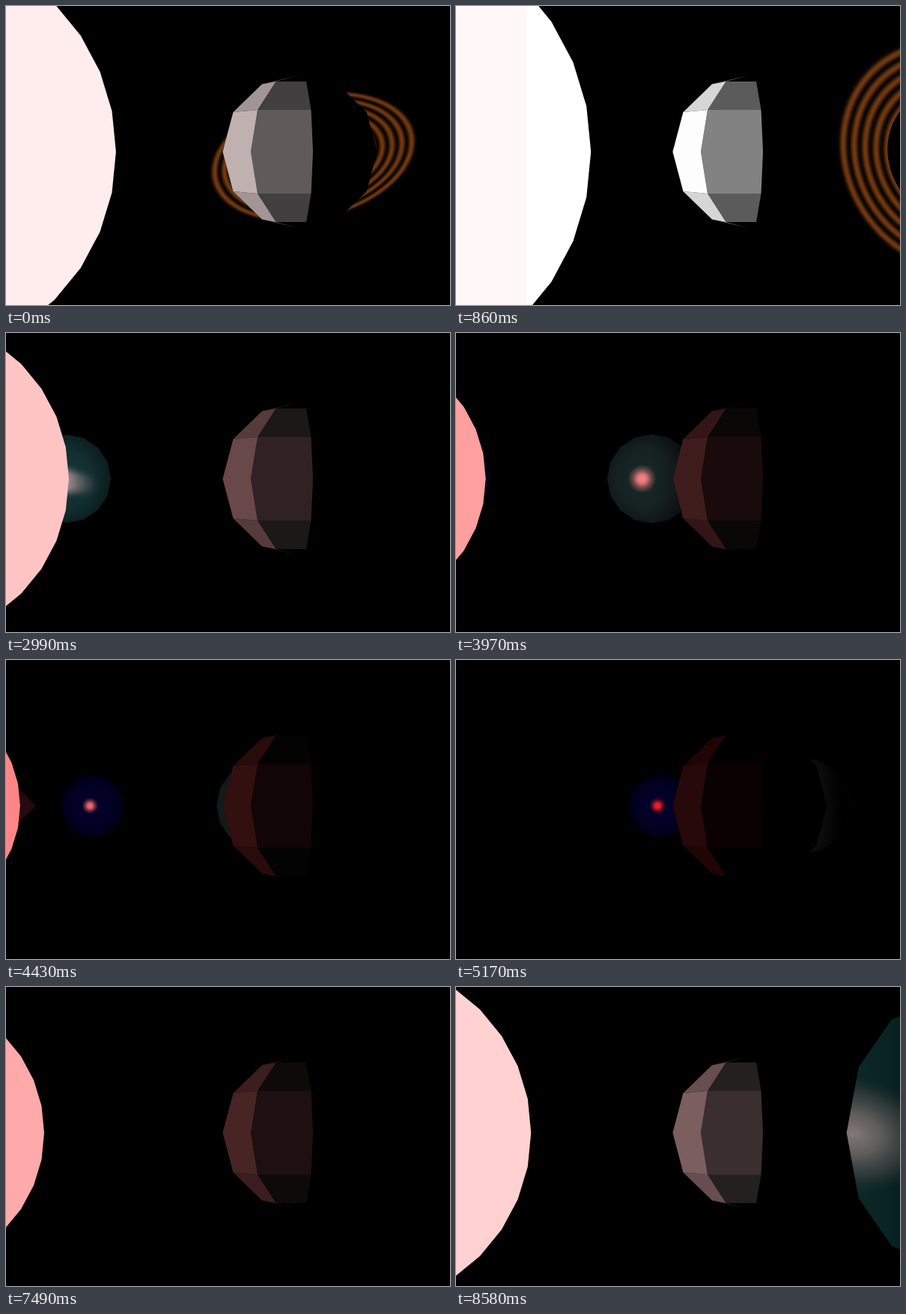
An HTML page with a canvas for the animation above (8600 ms loop, 593 by 400 pixels).

```html
<!DOCTYPE html>
<html lang="en">
<head>
<meta charset="utf-8">
<title>Low-poly planets</title>
<style>
html, body { margin: 0; width: 100%; height: 100%; overflow: hidden; background: #000; }
canvas { display: block; }
</style>
</head>
<body>
<canvas id="stage" width="593" height="400"></canvas>
<script>
const ctx = document.getElementById('stage').getContext('2d');
const W = 593, H = 400, LOOP = 8600, MID = 195;
const R_MIN = 127, R_MAX = 314, PACE = .0452;

const clamp = (v, lo = 0, hi = 1) => Math.min(hi, Math.max(lo, v));
const mix = (a, b, u) => a + (b - a) * u;
const mixColor = (a, b, u) => a.map((v, i) => mix(v, b[i], u));
const rgba = (c, alpha = 1) => `rgba(${c.map(Math.round).join(',')},${alpha})`;

// The star swells, shrinks to a hidden minimum, then swells again.
function starRadius(t) {
  return Math.max(R_MIN, 316 - PACE * Math.abs(t - 800), R_MIN + PACE * (t - 6230));
}

function starColor(light) {
  const g = 60 + 195 * light ** .48;
  return [255, g, g];
}

// A face goes from a dim red to a neutral grey; red leads the other channels.
function faceColor(light, red, rest, grey) {
  const ease = c => light * mix(light, 1, c);
  const cold = mix(rest, grey, ease(.1));
  return [mix(red, grey, ease(.27)), cold, cold];
}

function trace(points) {
  ctx.beginPath();
  points.forEach(([x, y]) => ctx.lineTo(x, y));
  ctx.closePath();
}

function poly(points, fill) {
  trace(points);
  ctx.fillStyle = fill;
  ctx.fill();
}

function ngon(n, x, y, rx, ry = rx) {
  return Array.from({ length: n }, (_, i) => {
    const a = i / n * 2 * Math.PI;
    return [x + rx * Math.cos(a), y + ry * Math.sin(a)];
  });
}

function disc(x, y, r, fill) {
  ctx.beginPath();
  ctx.arc(x, y, r, 0, 2 * Math.PI);
  ctx.fillStyle = fill;
  ctx.fill();
}

function withStops(g, stops) {
  stops.forEach(([at, c]) => g.addColorStop(at, c));
  return g;
}

const radial = (x, y, r, stops) => withStops(ctx.createRadialGradient(x, y, 0, x, y, r), stops);
const sideways = (x0, x1, stops) => withStops(ctx.createLinearGradient(x0, 0, x1, 0), stops);

function glow(x, r, star) {
  const c = star.map((v, i) => i ? v - 28 : v);
  disc(x, MID, r, radial(x, MID, r,
    [[0, rgba(c)], [.3, rgba(c, .88)], [.65, rgba(c, .35)], [1, rgba(c, 0)]]));
}

const RING_IN = 88, RING_OUT = 155;
const ringFill = withStops(ctx.createRadialGradient(0, 0, RING_IN, 0, 0, RING_OUT),
  Array.from({ length: 81 }, (_, i) => {
    const r = mix(RING_IN, RING_OUT, i / 80);
    const band = r > 153 ? 0 : Math.cos(Math.PI * (r - 147) / 14.6) ** 2;
    return [i / 80, rgba([115, 57, 15].map(v => v * mix(.1, 1, band)))];
  }));

function rings(t) {
  if (t > 1250) return;
  const u = t / 860;
  ctx.save();
  ctx.transform(mix(.895, 1, u), mix(-.136, .113, u), 0, mix(.553, 1.02, u), mix(410, 664, u), 201.5);
  ctx.beginPath();
  ctx.arc(0, 0, RING_OUT, 0, 2 * Math.PI);
  ctx.arc(0, 0, RING_IN, 0, 2 * Math.PI, true);
  ctx.fillStyle = ringFill;
  ctx.fill();
  ctx.restore();
}

function tealPlanet(t, star) {
  if (t < 2400 || t > 6700) return;
  const p = (t - 2990) / 3240, seen = clamp(p);
  const x = mix(81, 623, p) + 20 * Math.sin(Math.PI * p);
  const r = 59 + 17 * seen ** 3;
  const base = mixColor([18, 47, 49], [26, 20, 19], seen ** .6);
  const shape = ngon(16, x, MID, r);
  poly(shape, radial(x - 6, MID, r + 6, [[0, rgba(base.map(v => v * 1.15))],
    [.6, rgba(base)], [1, rgba(base.map(v => v * .6))]]));
  const night = clamp((t - 3300) / 1800);
  poly(shape, sideways(x, x + r * .8, [[0, 'rgba(0,0,0,0)'], [1, rgba([0, 0, 0], night)]]));
  if (t > 3400) {
    glow(x - mix(2, 38, seen), 19, star);
    return;
  }
  ctx.save();
  ctx.filter = 'blur(4px)';
  poly([[x - 10, 180], [x + 38, 194], [x + 38, 212], [x - 10, 214]],
    sideways(x, x + 40, [[0, 'rgba(190,160,160,.85)'], [1, 'rgba(150,125,125,0)']]));
  ctx.restore();
}

function bluePlanet(t, star) {
  if (t < 3700 || t > 6340) return;
  const dt = t - 4430, x = 114 + .23 * dt - .000024 * dt * dt;
  disc(x + 1, MID, 45, radial(x + 1, MID, 45,
    [[0, '#04002c'], [.6, '#020024'], [.85, '#01001a'], [1, 'rgba(0,0,12,0)']]));
  glow(x - 2, 11, star);
}

function redPlanet(t) {
  if (t < 4000 || t > 4750) return;
  poly(ngon(4, 18 - .1 * (t - 4430), MID, 22), '#250810');
}

function nearPlanet(t) {
  const left = 522 + .3 * (8580 - t);
  if (left > W) return;
  ctx.save();
  ctx.translate(left, MID);
  trace(ngon(12, 120, 0, 120, 175));
  ctx.clip();
  ctx.fillStyle = sideways(0, 90, [[0, '#0e2a2a'], [1, '#061d1d']]);
  ctx.fillRect(0, -MID, 240, H);
  ctx.rotate(.2);
  ctx.scale(1, .72);
  disc(8, 0, 108, radial(8, 0, 108, [[0, 'rgb(132,120,120)'], [.35, 'rgba(110,102,101,.85)'],
    [.7, 'rgba(75,73,72,.55)'], [1, 'rgba(40,50,50,0)']]));
  ctx.restore();
}

// Fixed faceted planet; its right half is unlit but still hides what is behind.
function facetPlanet(light) {
  const side = rgba(faceColor(light, 39, 9, 255));
  const bevel = faceColor(light, 32, 5, 216);
  const front = rgba(faceColor(light, 12, 1, 131));
  const frontBevel = rgba(faceColor(light, 0, 0, 92));
  const tip = [289.4, MID], low = [303.4, 142], high = [342, 104.5], pole = [390, 93];
  const innerTip = [327, MID], inner = [336, 139], top = [360.5, 101];
  const rimTop = [401, 101], rim = [407.5, 139], rimTip = [410, MID];
  const flip = ([x, y]) => [x, 2 * MID - y];
  const across = ([x, y]) => [785 - x, y];
  const half = (points, fill) => {
    poly(points, fill);
    poly(points.map(flip), fill);
  };
  half([tip, low, high, pole, ...[high, low, tip].map(across)], '#000');
  half([high, pole, top], rgba(bevel, .5));
  half([top, rimTop, rim, inner], frontBevel);
  half([low, high, top, inner], rgba(bevel));
  poly([innerTip, inner, rim, rimTip, flip(rim), flip(inner)], front);
  poly([tip, low, inner, innerTip, flip(inner), flip(low)], side);
}

function draw(t) {
  const radius = starRadius(t);
  const light = clamp((radius - R_MIN) / (R_MAX - R_MIN));
  const star = starColor(light);
  ctx.fillStyle = '#000';
  ctx.fillRect(0, 0, W, H);
  rings(t);
  tealPlanet(t, star);
  bluePlanet(t, star);
  redPlanet(t);
  facetPlanet(light);
  poly(ngon(32, -133, MID, radius), rgba(star));
  if (t > 450 && t < 1250) {
    ctx.fillStyle = '#fff8f7';
    ctx.fillRect(0, 0, 94, H);
  }
  nearPlanet(t);
}

const start = performance.now();
function tick() {
  draw((performance.now() - start) % LOOP);
  requestAnimationFrame(tick);
}
draw(0);
requestAnimationFrame(tick);
</script>
</body>
</html>
```
